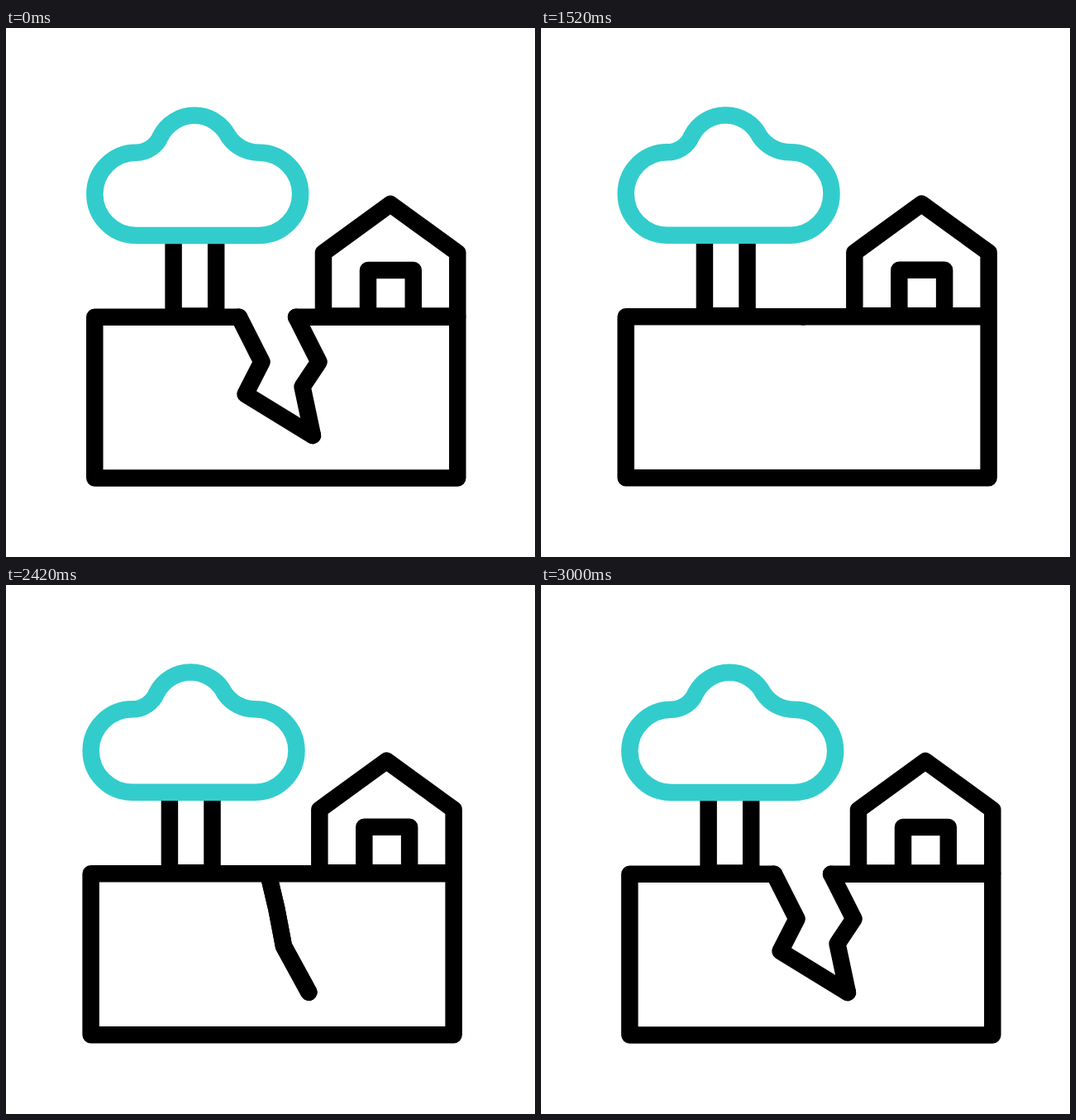
An HTML page for the animation above (3.22 s loop, 640 by 640 pixels).

```html
<!DOCTYPE html>
<html lang="en">
<head>
<meta charset="utf-8">
<title>Earthquake</title>
<style>
  html, body { margin: 0; width: 100%; height: 100%; overflow: hidden; background: #fff; }
  svg { display: block; width: 100%; height: 100%; }
  g { fill: none; stroke: #000; stroke-width: 20.5; stroke-linejoin: round; stroke-linecap: round; }
</style>
</head>
<body>
<svg viewBox="0 0 640 640">
  <g id="scene">
    <path d="M202.6 255V348.5H254.2V255"/>
    <path d="M384 348.5V272L465 213L546.3 272V348.5Z"/>
    <path d="M438 348.5V293H492.8V348.5"/>
    <path id="ground"/>
    <path id="left" pathLength="1"/>
    <path id="right" pathLength="1"/>
    <path stroke="#33cccc" d="M157.5 251a50 50 0 0 1 0 -100.3A32 32 0 0 0 187 131A46 46 0 0 1 269 131A44.6 44.6 0 0 0 306 150.7a50 50 0 0 1 0 100.3Z"/>
  </g>
</svg>
<script>
const LOOP = 3220, STEP = 20, TOP = 349.7, GAP = 69;

// Joints of the crack from mouth to tip: closed, and its left wall when open
const SHUT = [[322, TOP], [332, 392], [340.7, 437.5], [371, 493]];
const LEFT = [[282, TOP], [309.5, 404], [289.5, 443], [371, 493]];
// The right wall is the left one moved over, with its lowest joint lifted; both share the tip
const RIGHT = LEFT.map(([x, y], i) => i < 3 ? [x + GAP, y - 4.5 * i * (i - 1)] : [x, y]);

const $ = id => document.getElementById(id);
const ramp = (t, from, to) => Math.min(1, Math.max(0, (t - from) / (to - from)));
const mix = (a, b, k) => a.map((v, i) => v + (b[i] - v) * k);

// The tremor jumps between the corners of a square, five corners to a round
function corner(n) {
  const k = n % 5;
  const x = k % 2 || k === 4 ? -14 : 0;
  return [x, k === 2 || k === 3 ? 15 : x / 14];
}

function shake(t) {
  const start = t < 2400 ? 1500 : 2400;
  const u = ramp(t, start, start + 600) * 10, n = Math.floor(u);
  return mix(corner(n), corner(n + 1), u - n);
}

function crack(t) {
  if (t >= 1500) {
    const open = ramp(t, 2580, 3000);
    return { mouth: open, depth: open, length: ramp(t, 1724, 2100) };
  }
  // The lower part shuts before the mouth does
  const shut = ramp(t, 200, 600), late = ramp(t, 600, 900);
  return { mouth: 1 - 0.73 * shut - 0.27 * late, depth: 1 - shut, length: 1 - ramp(t, 620, 900) };
}

function drawWall(id, open, { mouth, depth, length }) {
  const points = SHUT.map((p, i) => mix(p, open[i], i ? depth : mouth));
  $(id).setAttribute("d", "M" + points.join("L"));
  $(id).setAttribute("stroke-dasharray", length < 1 ? length + " 2" : "none");
  return points[0][0];
}

function draw(t) {
  const state = crack(t);
  const from = drawWall("left", LEFT, state), to = drawWall("right", RIGHT, state);
  $("ground").setAttribute("d", `M${from} ${TOP}H107.3V544.5H546.3V${TOP}H${to}`);
  $("scene").setAttribute("transform", `translate(${shake(t)})`);
}

function tick() {
  draw(Math.floor(performance.now() % LOOP / STEP) * STEP);
  requestAnimationFrame(tick);
}
tick();
</script>
</body>
</html>
```
